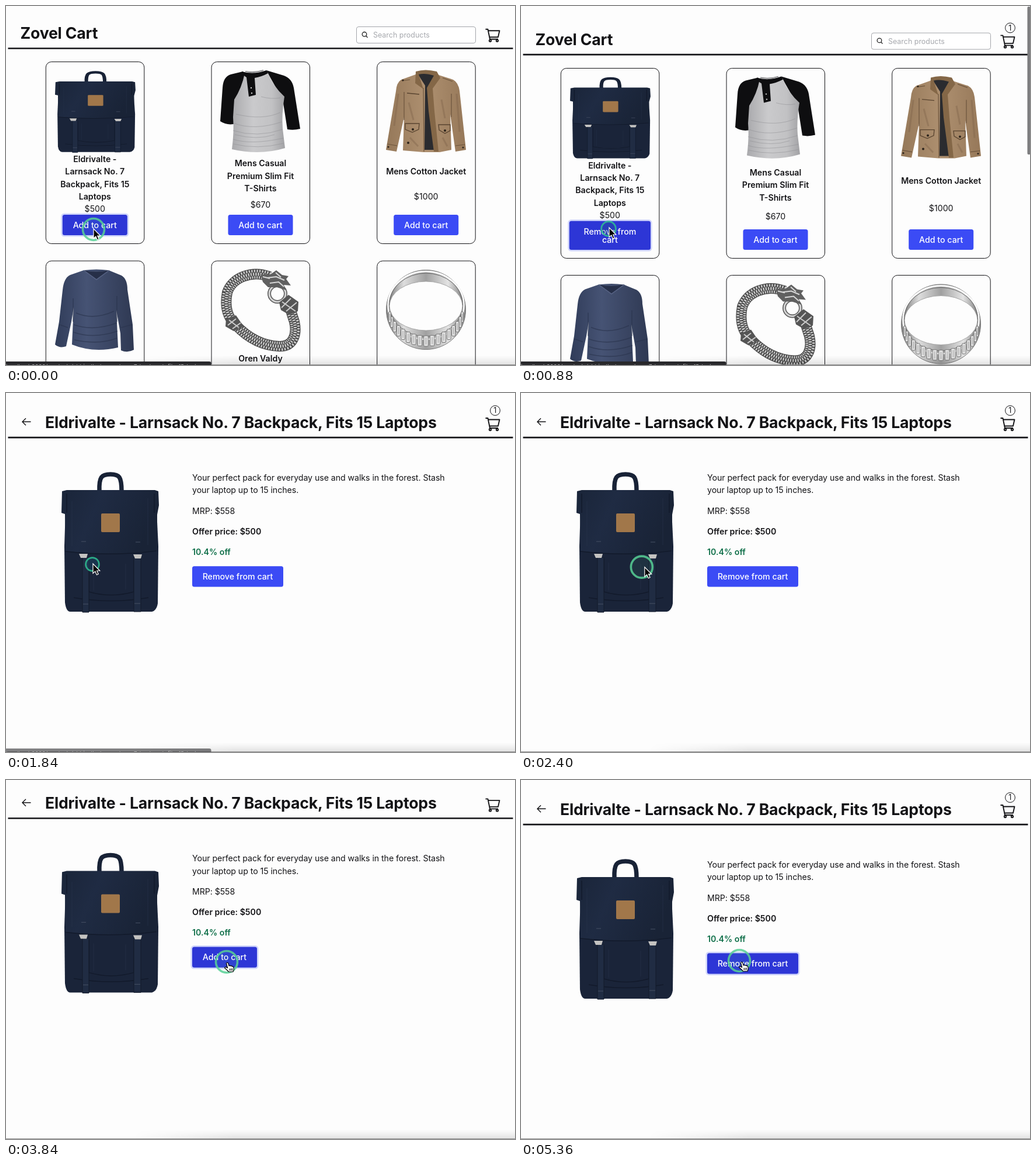
These frames come from a looping animation (872x614 px, 5440 ms). An HTML page:

```html
<!DOCTYPE html>
<html lang="en">
<head>
<meta charset="utf-8">
<title>Zovel Cart</title>
<style>
  html, body { margin: 0; width: 100%; height: 100%; overflow: hidden; background: #fdfdfd; }
  svg { display: block; width: 872px; height: 614px; }
  text { font-family: Inter, "Open Sans", sans-serif; font-optical-sizing: none; white-space: pre; }
</style>
</head>
<body>
<svg id="stage" viewBox="0 0 872 614" xmlns="http://www.w3.org/2000/svg">
  <defs>
    <linearGradient id="navy" x2="1" y2=".3">
      <stop stop-color="#1a2539"/><stop offset=".4" stop-color="#1f2b43"/><stop offset="1" stop-color="#192336"/>
    </linearGradient>
    <linearGradient id="grey"><stop stop-color="#a9a9ac"/><stop offset=".4" stop-color="#cacacc"/><stop offset=".75" stop-color="#c2c2c4"/><stop offset="1" stop-color="#a2a2a5"/></linearGradient>
    <linearGradient id="tan"><stop stop-color="#957859"/><stop offset=".5" stop-color="#ae9070"/><stop offset="1" stop-color="#967859"/></linearGradient>
    <linearGradient id="blue"><stop stop-color="#303c59"/><stop offset=".4" stop-color="#465374"/><stop offset="1" stop-color="#2f3953"/></linearGradient>
    <linearGradient id="steel"><stop stop-color="#808080"/><stop offset=".2" stop-color="#dedede"/><stop offset=".5" stop-color="#a0a0a0"/><stop offset=".8" stop-color="#e4e4e4"/><stop offset="1" stop-color="#808080"/></linearGradient>
    <linearGradient id="dusk" x2="0" y2="1"><stop stop-color="#000" stop-opacity="0"/><stop offset="1" stop-color="#000" stop-opacity=".1"/></linearGradient>
    <linearGradient id="fade"><stop offset=".25" stop-color="#000"/><stop offset=".45" stop-color="#fff"/></linearGradient>
    <mask id="side"><rect width="872" height="614" fill="url(#fade)"/></mask>

    <g id="pack">
      <path d="M160 168C159 143 164 139 179 139S198 143 198 168" fill="none" stroke="#182236" stroke-width="7.500"/>
      <path d="M102 200L100 262L101 358Q103 374 110 374H250Q258 372 260 360L261 262L258 200Z" fill="#1a2439"/>
      <path d="M96 168L104 166H255L261 168L262 192L259 208L258 270Q180 279 102 270L101 207L95 205Z" fill="url(#navy)"/>
      <path d="M102 271Q180 280 258 270M104 172V205M254 172V205M142 284V340Q180 351 219 340V284M116 350Q180 361 244 350" fill="none" stroke="#121a2b" stroke-width="1.500"/>
      <path d="M113 185V262M243 180V260M150 290V338M205 292V336" stroke="#28354d" opacity=".6"/>
      <path d="M131 281H142V375H131ZM219 281H231V374H219Z" fill="#202c43" stroke="#121a2b"/>
      <path d="M129 254H137M222 255H230M132 361H141M220 360H230" stroke="#465064"/>
      <path d="M125 275H140L138 282H128ZM218 276H233L231 283H221Z" fill="#c4c3c1"/>
      <rect x="163" y="206" width="32" height="32" rx="2" fill="#a1774a"/>
    </g>

    <g id="tee">
      <path d="M406 112L385 117Q372 121 371 140L367 197Q377 204 390 202L394 165L410 120ZM446 110L476 119Q490 124 493 140L504 210Q493 213 482 211L474 160L448 114Z" fill="#0e0e10"/>
      <path d="M409 115Q427 125 448 113Q458 138 477 155Q472 185 474 210L478 243Q435 256 387 245Q391 215 389 190L391 160Q404 140 409 115Z" fill="url(#grey)"/>
      <path d="M389 200Q425 214 473 198M389 213Q430 226 474 211M389 228Q420 238 475 226M394 185Q440 196 470 182M437 155Q455 160 470 157M392 220Q430 230 460 220M390 236Q430 246 475 235" fill="none" stroke="#8c8c90" opacity=".5"/>
      <path d="M404 112Q424 118 446 110L449 115Q438 121 426 123L428 152L416 155L412 122Q406 119 404 112Z" fill="#0e0e10"/>
      <path d="M410 112Q426 115 441 110" fill="none" stroke="#8e8e90" stroke-width="2"/>
      <circle cx="420" cy="140" r="1.200" fill="#ccc"/><circle cx="421" cy="149" r="1.200" fill="#ccc"/>
    </g>

    <g id="jacket">
      <path d="M702 117L677 126Q669 131 668 146L651 246L669 249L682 190L680 247L715 250H743L763 246L761 185L770 249L788 246L777 145Q775 131 766 126L738 117Z" fill="url(#tan)"/>
      <path d="M704 114L718 136L717 246H734L728 180L724 150L736 116Z" fill="#2a2b2f"/>
      <path d="M702 112Q718 107 738 112L744 123L731 141L734 180L741 249H733L724 180L721 140L733 119Q718 114 707 117L715 142L701 132Z" fill="#846747"/>
      <path d="M682 147L682 195M763 150V190M715 140L716 249M653 236L670 239M770 239L786 237M678 128L692 126M748 123L765 129" fill="none" stroke="#6c543c" stroke-width="1.200"/>
      <path d="M672 150L665 205M772 150L777 215M690 165L698 195M746 160L752 192M692 225L706 240M748 225L756 240" fill="none" stroke="#7d6349" stroke-width="3" opacity=".4"/>
      <path d="M687 149L708 151M684 201H708L707 211L696 216L684 211ZM741 203H761V213L752 218L742 212Z" fill="none" stroke="#594430" stroke-width="1.300"/>
      <g fill="#2d241c"><circle cx="697" cy="211" r="2"/><circle cx="752" cy="213" r="2"/><circle cx="689" cy="234" r="2"/><circle cx="680" cy="127" r="1.500"/><circle cx="655" cy="241" r="1.500"/><circle cx="783" cy="242" r="1.500"/></g>
    </g>

    <g id="jumper">
      <path d="M133 452L110 460Q99 465 97 486L91 540L84 579Q92 586 103 582L112 540L116 515L113 579Q150 594 192 584L189 520L196 560L197 589Q208 594 219 588L217 545L208 485Q208 467 198 461L176 452Q155 449 133 452Z" fill="url(#blue)"/>
      <path d="M134 452Q155 457 176 452L155 467Z" fill="#262f48"/>
      <path d="M133 452L155 468L177 452" fill="none" stroke="#566283" stroke-width="1.500"/>
      <path d="M115 500V540M190 496V540M116 545Q150 557 190 542M116 558Q150 570 191 556M117 571Q160 580 190 568M92 545L106 550M197 550L216 545M120 525Q150 538 185 522" fill="none" stroke="#28324c" opacity=".6" stroke-width="1.600"/>
    </g>

    <path id="chain" d="M452 463C420 451 387 465 379 490C374 516 380 533 394 546C415 568 440 581 468 582C492 583 499 562 494 540L485 512" fill="none"/>
    <g id="bracelet">
      <use href="#chain" stroke="#474747" stroke-width="18"/>
      <use href="#chain" stroke="#c9c9c9" stroke-width="15.500" stroke-dasharray="2.200 2"/>
      <use href="#chain" stroke="#4a4a4a" stroke-width="7" stroke-dasharray="2 2.200"/>
      <use href="#chain" stroke="#e2e2e2" stroke-width="5" stroke-dasharray="1.600 2.600" stroke-dashoffset="1.800"/>
      <circle cx="465" cy="492" r="14" fill="none" stroke="#555" stroke-width="6"/>
      <circle cx="465" cy="492" r="14" fill="none" stroke="#d2d2d2" stroke-width="3"/>
      <path d="M436 459L453 459L463 452L473 460L484 462L480 467L488 478L476 477L480 486L464 481L449 481L440 472Z" fill="#606060"/>
      <path d="M440 463L452 466M447 465L463 463L477 469M452 474L467 472L476 480M462 456L471 464" stroke="#d8d8d8" stroke-width="2" fill="none"/>
      <path d="M468 507L484 494L501 506L500 522L485 528L471 520ZM377 535L394 529L407 548L390 556L376 548Z" fill="#555"/>
      <path d="M472 516L488 500M480 522L498 507M473 506L496 522M380 546L394 535M388 552L402 542M382 537L399 550" stroke="#ccc" stroke-width="2"/>
    </g>

    <g id="band"></g>
  </defs>

  <rect width="872" height="614" fill="#fdfdfd"/>
  <g id="scenes"></g>
  <rect x="200" y="598" width="672" height="15" fill="url(#dusk)" mask="url(#side)"/>
  <path d="M0 613.500H872" stroke="#8c8c8c"/>
  <g id="status">
    <path d="M0 608H348Q351.500 608 351.500 611V614H0Z" fill="#29292c"/>
    <text x="0" y="619.500" font-size="9.600" fill="#c4c4c4">localhost:3000/products/eldrivalte-larnsack-no-7-backpack-fits-15-laptops</text>
  </g>
  <circle id="halo"/>
  <g id="arrow"><path d="M0 0V16.500L3.800 13L6.400 19L9.200 17.800L6.700 12H11.800Z" fill="#000" stroke="#fff" stroke-width="1.200"/></g>
  <g id="hand">
    <path d="M-1.500 1.500Q0 -.8 1.600 1.200L3 6Q4.600 4.800 5.800 6.200Q7.400 5.200 8.400 7Q10.400 6.500 10.800 8.500L11.300 12L10 16H2.500L-1.500 12L-4.300 9.500Q-4 7.200 -1.600 8.200L.6 9.500Z" fill="#fff" stroke="#000" stroke-width="1.200" stroke-linejoin="round"/>
    <path d="M4 10.500V14M6.200 10.300V14M8.400 10V14" stroke="#000"/>
  </g>
</svg>
<script>
const LOOP = 5440, STEP = 80, SHIFT = 10.6;
const INK = '#131316';
const FILLS = ['#3b4bf5', '#3540e8', '#2d36d6'];
const $ = id => document.getElementById(id);

const text = (x, y, s, attrs = '') => `<text x="${x}" y="${y}" font-size="14.2" fill="${INK}" ${attrs}>${s}</text>`;
const mid = (x, y, s, attrs = '') => text(x, y, s, `text-anchor="middle" ${attrs}`);
const prose = (y, s) => text(319, y, s, 'letter-spacing="-.07"');
const move = (dy, s) => `<g transform="translate(0 ${dy})">${s}</g>`;
const title = (x, y, s) => text(x, y, s, 'style="font-size:26.67px;font-weight:650;letter-spacing:-.008em"');

// state: 0 idle, 1 hovered, 2 focused
function button(x, y, w, h, lines, state) {
  const glow = state === 2
    ? `<rect x="${x - 2.5}" y="${y - 2.5}" width="${w + 5}" height="${h + 5}" rx="5.500" fill="#d0d5fb"/>` : '';
  const first = y + h / 2 + 5.2 - (lines.length - 1) * 7.1;
  return glow + `<rect x="${x}" y="${y}" width="${w}" height="${h}" rx="3.500" fill="${FILLS[state]}"/>` +
    lines.map((s, i) => mid(x + w / 2, first + i * 14.2, s, 'style="fill:#fff;font-weight:500"')).join('');
}

// y is the centre of the cart
function cart(y, count) {
  const badge = count
    ? `<circle cx="838" cy="${y - 23}" r="8.400" fill="none" stroke="${INK}"/>` +
      mid(837.8, y - 18.6, count, 'style="font-size:12.4px"') : '';
  return badge + `<g transform="translate(834 ${y})" fill="none" stroke="${INK}" stroke-width="1.900" stroke-linejoin="round">
    <path d="M-12.500 -10H-8.500L-5 7H9M-8 -7.500H11.500L9 3.500H-5.600"/>
    <circle cx="-4.500" cy="9.500" r="1.700"/><circle cx="7.500" cy="9.500" r="1.700"/></g>`;
}

const rule = y => `<path d="M3.500 ${y}H868.500" stroke="${INK}" stroke-width="2.700"/>`;

const products = [
  { x: 152.3, art: 'pack', name: ['Eldrivalte -', 'Larnsack No. 7', 'Backpack, Fits 15', 'Laptops'], price: '$500', y: [267, 277.6], py: [352, 362.6] },
  { x: 436, art: 'tee', name: ['Mens Casual', 'Premium Slim Fit', 'T-Shirts'], price: '$670', y: [274.3, 290], py: [345, 364.6] },
  { x: 719.7, art: 'jacket', name: ['Mens Cotton Jacket'], price: '$1000', y: [288.4, 304], py: [331, 350.5] },
];

function list(added) {
  const n = +added, dy = n * SHIFT;
  const top = 95.5 + n * 11, height = 311 + n * 14, below = n * 24.5;
  const frame = (x, y, h) => `<rect x="${x - 84}" y="${y}" width="168.500" height="${h}" rx="9.500" fill="#fdfdfd" stroke="${INK}"/>`;
  const header = title(24.5, 56.2, 'Zovel Cart') + rule(72.5) +
    `<rect x="600.500" y="35.500" width="204" height="28" rx="3.500" fill="#fff" stroke="#a3a5aa"/>
     <g fill="none" stroke="#222" stroke-width="1.300"><circle cx="614" cy="48.300" r="3.800"/><path d="M616.800 51.200L619.500 54"/></g>` +
    text(629, 54, 'Search products', 'style="font-size:12.44px;fill:#a6a8ad"');
  const cards = products.map((p, i) => {
    const act = added && i === 0
      ? button(82.8, 367.8, 139.2, 49.2, ['Remove from', 'cart'], 2)
      : button(p.x - 55.5, 357 + n * 25, 111, 35, ['Add to cart'], i ? 0 : 2);
    const art = p.art === 'pack'
      ? '<use href="#pack" transform="translate(5.530 32.560) scale(.826 .581)"/>' : `<use href="#${p.art}"/>`;
    return frame(p.x, top, height) + move(dy, art) +
      p.name.map((s, k) => mid(p.x, p.y[n] + k * 21.3, s, 'font-weight="600"')).join('') +
      mid(p.x, p.py[n], p.price) + act;
  }).join('');
  const next = ['jumper', 'bracelet', 'band'].map((id, i) =>
    frame(products[i].x, 436, 330) + `<use href="#${id}"/>`).join('') + mid(436, 607.5, 'Oren Valdy', 'font-weight="600"');
  const bar = added ? '<rect x="867.500" y="1" width="5" height="253" rx="2" fill="#7d7d7f"/>' : '';
  return move(dy, header) + cart(49.8 + dy, n) + cards + move(below, next) + bar;
}

function detail(added, state) {
  const label = added ? 'Remove from cart' : 'Add to cart';
  const body = `<path d="M42.500 49.300H28M34 43.300L28 49.300L34 55.300" fill="none" stroke="${INK}" stroke-width="1.400"/>` +
    title(67, 59.7, 'Eldrivalte - Larnsack No. 7 Backpack, Fits 15 Laptops') + rule(76.1) + '<use href="#pack"/>' +
    prose(150, 'Your perfect pack for everyday use and walks in the forest. Stash') +
    prose(171.3, 'your laptop up to 15 inches.') +
    prose(206.5, 'MRP: $558') +
    text(319, 241.7, 'Offer price: $500', 'font-weight="600"') +
    text(319, 277, '10.4% off', 'style="font-weight:600;fill:#0f6f49"') +
    button(319, 296.2, added ? 156 : 111, 35.2, [label], state) + cart(53, added ? 1 : 0);
  return move(added ? 0 : -SHIFT, body);
}

function band() {
  let s = `<circle cx="719.500" cy="519.500" r="68" fill="url(#steel)" stroke="#777"/>
    <ellipse cx="719.500" cy="512" rx="65" ry="58" fill="none" stroke="#fff" stroke-width="2.500"/>
    <ellipse cx="719.500" cy="511" rx="63" ry="54" fill="url(#steel)" stroke="#666"/>
    <ellipse cx="719.500" cy="513" rx="62.500" ry="42" fill="#fdfdfd" stroke="#a5a5a5"/>`;
  for (let i = 0; i < 17; i++) {
    const a = (14 + i * 9.5) * Math.PI / 180, k = Math.sin(a);
    const x = 719.5 + 64 * Math.cos(a), y = 519 + 54 * k, w = 3 + 4.5 * k;
    s += `<rect x="${x - w / 2}" y="${y - 9}" width="${w}" height="18" rx="1.500" fill="#e2e2e2" stroke="#737373"/>
      <path d="M${x} ${y - 6}V${y + 6}" stroke="#999"/>`;
  }
  return s;
}

const scenes = [
  [0, list(false)], [880, list(true)], [1760, detail(true, 0)],
  [2640, detail(true, 1)], [3360, detail(false, 2)], [4480, detail(true, 2)],
];
const pointer = [[0, 150, 381], [880, 151, 379], [1200, 151, 379], [1620, 149, 292], [2160, 149, 292], [2860, 380, 313], [3840, 379, 312], [5360, 378, 311]];
const trail = [[0, 150, 382], [880, 150, 381], [1200, 150, 381], [1740, 148, 293], [2160, 148, 293], [2880, 375, 311], [3840, 378, 311], [5360, 374, 309]];
const clicks = [850, 1830, 3300, 4420];

const clamp = v => Math.max(0, Math.min(1, v));

function at(keys, t) {
  let i = 0;
  while (i < keys.length - 2 && t >= keys[i + 1][0]) i++;
  const [t0, x0, y0] = keys[i], [t1, x1, y1] = keys[i + 1];
  const p = clamp((t - t0) / (t1 - t0)), e = p * p * (3 - 2 * p);
  return [x0 + (x1 - x0) * e, y0 + (y1 - y0) * e];
}

function set(el, attrs) {
  for (const k in attrs) el.setAttribute(k, attrs[k]);
}

$('band').innerHTML = band();
$('scenes').innerHTML = scenes.map(s => `<g>${s[1]}</g>`).join('');
const layers = [...$('scenes').children];

function draw(time) {
  const t = Math.floor((time % LOOP) / STEP) * STEP;
  const now = scenes.filter(s => s[0] <= t).length - 1;
  layers.forEach((g, i) => { g.style.display = i === now ? '' : 'none'; });

  $('status').style.opacity = t < 1840 ? 1 : clamp(.58 - (t - 1840) / 420);

  const press = Math.max(...clicks.map(c => clamp(1 - Math.abs(t - c) / 170)));
  const [hx, hy] = at(trail, t);
  set($('halo'), {
    cx: hx, cy: hy, r: 18.5 - 7.5 * press,
    fill: press ? '#1c5878' : '#59d39a', 'fill-opacity': .08 + .25 * press,
    stroke: press > .5 ? '#2fc193' : '#57d096', 'stroke-width': 3.6 - press, 'stroke-opacity': .85,
  });

  const [x, y] = at(pointer, t), over = now > 2;
  $('arrow').style.display = over ? 'none' : '';
  $('hand').style.display = over ? '' : 'none';
  set($(over ? 'hand' : 'arrow'), { transform: `translate(${x} ${y})` });
}

const start = performance.now();
function tick() {
  draw(performance.now() - start);
  requestAnimationFrame(tick);
}
tick();
</script>
</body>
</html>
```
